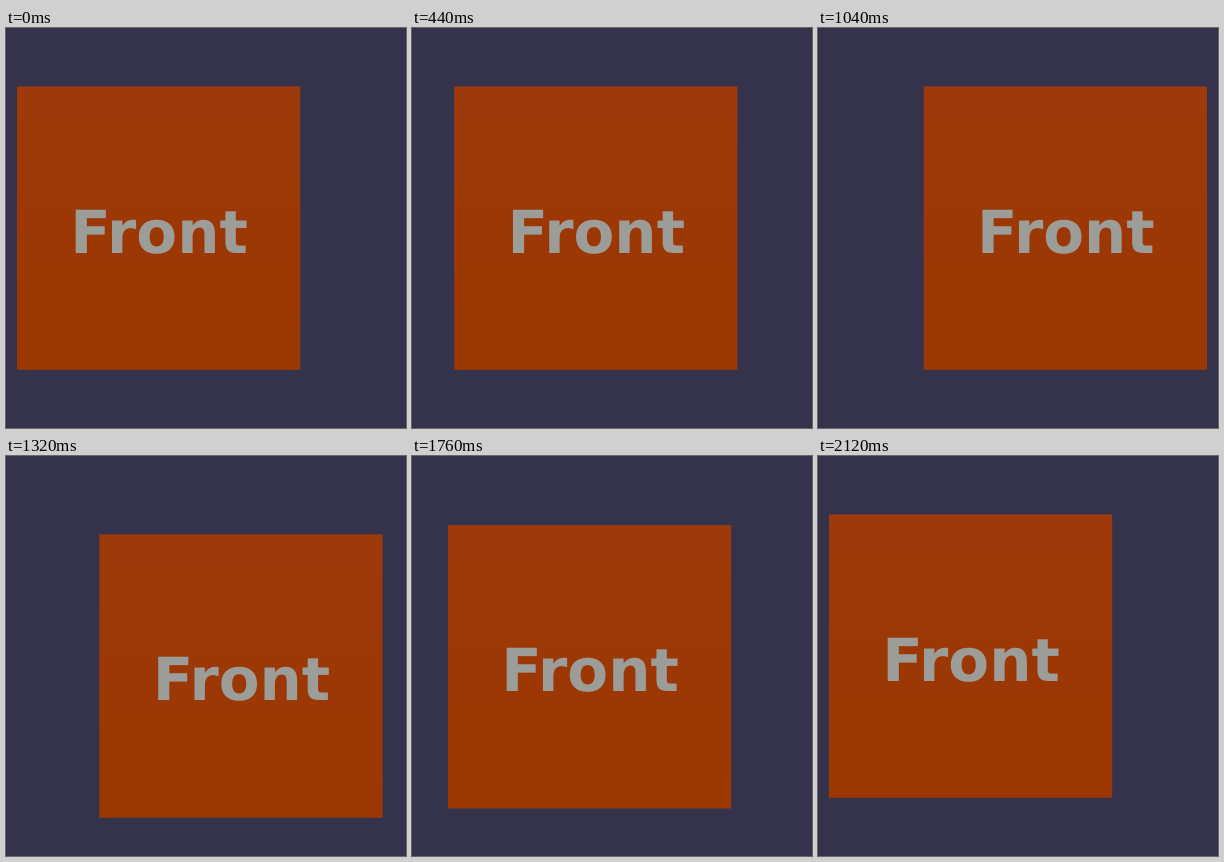
Animation of 400 by 400 pixels, one loop 2.16 s. Source, as an HTML page:

```html
<!DOCTYPE html>
<html lang="en">
<head>
<meta charset="utf-8">
<title>Front</title>
<style>
  html, body { margin: 0; width: 100%; height: 100%; overflow: hidden; background: #34334b; }
  svg { display: block; width: 400px; height: 400px; }
  text {
    font: bold 59.4px "DejaVu Sans", Verdana, sans-serif;
    text-anchor: middle; text-rendering: geometricPrecision; fill: #9c9c98;
  }
</style>
</head>
<body>
<svg viewBox="0 0 400 400">
  <defs>
    <linearGradient id="shade" x2="0" y2="1">
      <stop stop-color="#9e390b"/>
      <stop offset="1" stop-color="#9b3700"/>
    </linearGradient>
  </defs>
  <g id="face">
    <rect width="283.2" height="283.4" fill="url(#shade)"/>
    <text x="142.1" y="166.2">Front</text>
  </g>
</svg>
<script>
const LOOP = 2160, STEP = 40;
const LEFT = 11, TOP = 58.4, SWING = 95, DROP = 21;
const face = document.getElementById('face');

const progress = (t, from, to) => Math.min(1, Math.max(0, (t - from) / (to - from)));
const easeInOut = p => (1 - Math.cos(Math.PI * p)) / 2;
const easeOut = p => Math.sin(Math.PI / 2 * p);

// Glide right, then dip below the line on the way back
function pose(t) {
  const right = easeInOut(progress(t, 40, 1070));
  const back = easeInOut(progress(t, 1070, 2120));
  const down = easeOut(progress(t, 1050, 1390));
  const up = easeInOut(progress(t, 1410, 2120));
  return [LEFT + SWING * (right - back), TOP + DROP * (down - up)];
}

const start = performance.now();
function draw() {
  const t = Math.max(0, performance.now() - start) % LOOP;
  const [x, y] = pose(Math.floor(t / STEP) * STEP);
  face.setAttribute('transform', `translate(${x} ${y})`);
  requestAnimationFrame(draw);
}
draw();
</script>
</body>
</html>
```
